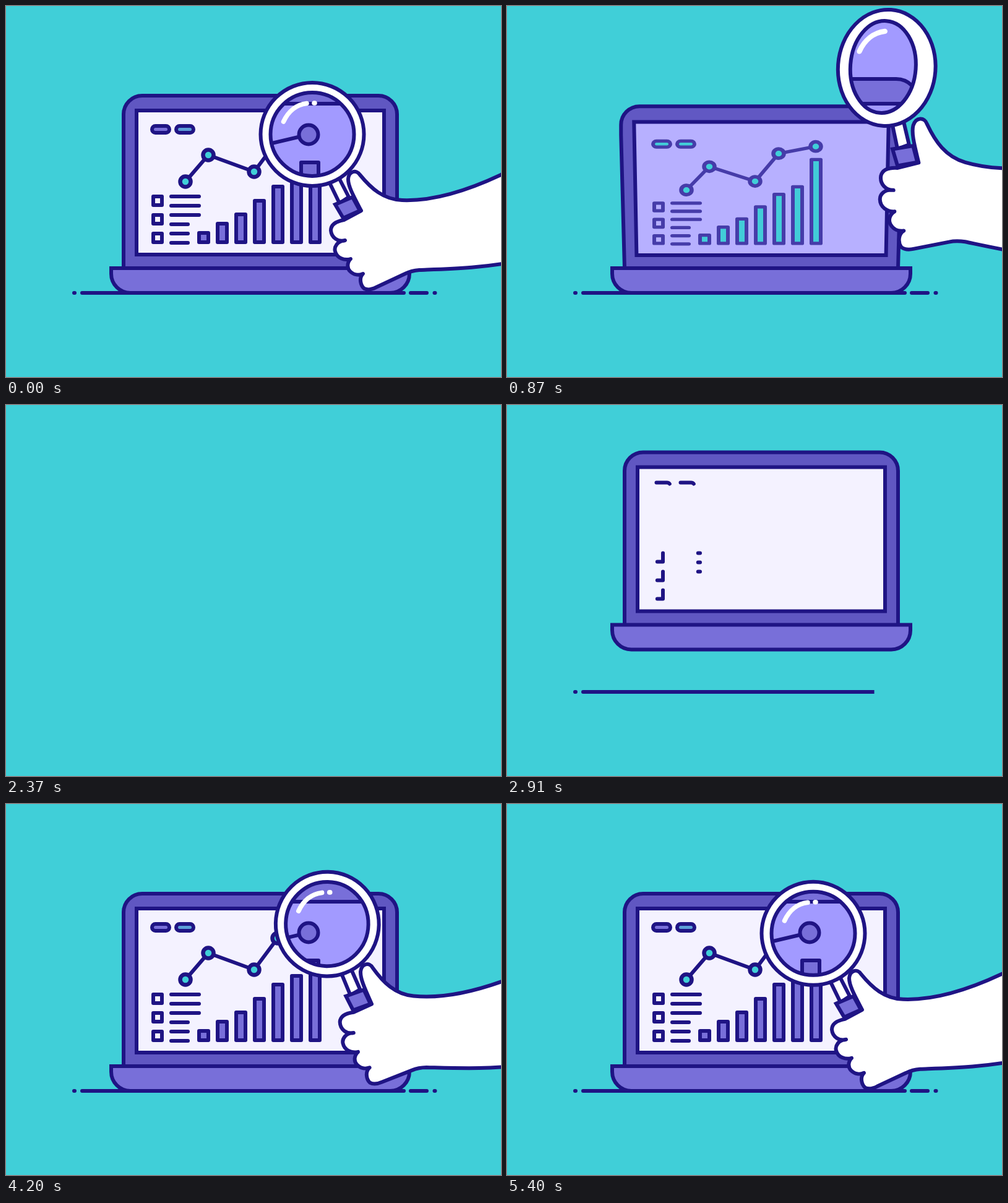
Write an HTML page with a canvas that moves like this. It is 800 by 600 pixels and loops after 5430 ms.

```html
<!DOCTYPE html>
<html lang="en">
<head>
<meta charset="utf-8">
<title>Laptop analytics</title>
<style>
html, body { margin: 0; width: 100%; height: 100%; overflow: hidden; background: #40cfd8; }
canvas { display: block; }
</style>
</head>
<body>
<canvas id="stage" width="800" height="600"></canvas>
<script>
const ctx = document.getElementById('stage').getContext('2d');
const LOOP = 5430;
const INK = '#1f1484', TEAL = '#40cfd8', VIOLET = '#786fd9', LENS = '#a29aff', WHITE = '#ffffff';
const POINTS = [[290, 284], [327, 241], [401, 268], [439, 217], [499, 204]];
const BAR_TOPS = [367, 352, 337, 315, 292, 278, 228];
const HAND_SHAPE = new Path2D(
  'M960 180C860 245 740 318 640 314C610 313 590 295 572 273C566 264 554 267 553 280' +
  'C553 292 562 308 574 331L546 346C530 349 525 356 525 363C526 375 537 382 548 379' +
  'C535 380 530 390 532 397C535 408 547 412 557 409C551 415 551 424 556 429' +
  'C562 435 570 436 577 433C570 440 573 452 579 457C585 460 592 458 598 455' +
  'L645 433Q655 428 668 427C720 425 770 424 830 412C900 398 960 375 1060 330Z');

const clamp = (v) => Math.max(0, Math.min(1, v));
const ramp = (t, a, b) => clamp((t - a) / (b - a));
const lerp = (a, b, p) => a + (b - a) * p;
const smooth = (p) => p * p * (3 - 2 * p);
const easeOut = (p) => 1 - (1 - p) ** 3;
const backOut = (p) => 1 + 3.3 * (p - 1) ** 3 + 2.3 * (p - 1) ** 2;
const arch = (p) => Math.sin(Math.PI * p);

function mix(a, b, p) {
  const ch = (c, i) => parseInt(c.slice(i, i + 2), 16);
  return 'rgb(' + [1, 3, 5].map((i) => Math.round(lerp(ch(a, i), ch(b, i), clamp(p)))).join() + ')';
}

function pen(color = INK, width = 6) {
  ctx.strokeStyle = color;
  ctx.lineWidth = width;
  ctx.lineCap = ctx.lineJoin = 'round';
}

function paint(fill) {
  ctx.fillStyle = fill;
  ctx.fill();
  ctx.stroke();
}

function poly(points, close) {
  ctx.beginPath();
  points.forEach(([x, y]) => ctx.lineTo(x, y));
  if (close) ctx.closePath();
}

function disc(x, y, r, fill) {
  ctx.beginPath();
  ctx.arc(x, y, r, 0, 7);
  paint(fill);
}

function box(x, y, w, h, r, fill) {
  ctx.beginPath();
  ctx.roundRect(x, y, w, h, r);
  paint(fill);
}

// Strokes only the leading part of the current path.
function trim(length, p) {
  if (p <= 0) return;
  if (p < 1) ctx.setLineDash([length * p, length * 2]);
  ctx.stroke();
  ctx.setLineDash([]);
}

function drawPills(p, fade) {
  [250, 289].forEach((x, i) => {
    ctx.beginPath();
    ctx.roundRect(x - 14, 194, 28, 11, 5.5);
    if (p >= 0.9) {
      ctx.fillStyle = mix(i ? '#5c9fd8' : VIOLET, TEAL, fade);
      ctx.fill();
    }
    trim(70, p);
  });
}

function drawList(t) {
  for (let i = 0; i < 3; i++) {
    const y = 315 + i * 30;
    poly([[252, y - 7], [252, y + 7], [238, y + 7], [238, y - 7]], true);
    trim(57, easeOut(ramp(t, 2855, 3200)));
  }
  for (let i = 0; i < 6; i++) {
    const right = i < 3 ? 312 : 294, start = i < 3 ? 2902 : 2960;
    poly([[right, 308 + i * 15], [267, 308 + i * 15]]);
    trim(right - 267, easeOut(ramp(t, start, start + 330)));
  }
}

function drawBars(t, fill) {
  BAR_TOPS.forEach((top, i) => {
    const start = 3094 + 72 * i;
    if (t <= start) return;
    const h = Math.max(0, (382 - top) * backOut(ramp(t, start, start + 560)));
    box(312 + 30 * i, 382 - h, 15, h, 0, fill);
  });
}

function drawChart(t, ink) {
  poly(POINTS);
  trim(261, ramp(t, 3180, 3685));
  POINTS.forEach(([x, y], i) => {
    const start = 3350 + 70 * i;
    const s = ramp(t, start, start + 220);
    if (!s) return;
    pen(ink, 6.5 * s);
    disc(x, y, 8.5 * s, TEAL);
  });
}

function drawContent(t, shut) {
  const ink = mix(INK, LENS, 4 * shut);
  const fade = clamp(13 * shut);
  ctx.save();
  ctx.globalAlpha = 1 - ramp(shut, 0.08, 0.25);
  ctx.translate(0, 382 + 2 * fade);
  ctx.scale(1, 1 - 1.6 * Math.min(shut, 0.3));
  ctx.translate(0, -382);
  pen(ink);
  drawPills(easeOut(ramp(t, 2865, 3250)), fade);
  drawList(t);
  drawBars(t, mix(VIOLET, TEAL, fade));
  drawChart(t, ink);
  ctx.restore();
}

function drawLid(shut, tint) {
  const cx = 411, base = 424, r = 30;
  const h = lerp(279, 49, shut), top = base - h;
  const spread = 21 * Math.sqrt(shut), wide = 221 + spread;
  const knee = base - lerp(h - r, 8, shut);
  ctx.beginPath();
  ctx.moveTo(cx - 221, base);
  ctx.lineTo(cx - wide, knee);
  ctx.arcTo(cx - wide, top, cx, top, r);
  ctx.arcTo(cx + wide, top, cx + wide, knee, r);
  ctx.lineTo(cx + wide, knee);
  ctx.lineTo(cx + 221, base);
  paint(mix('#6057c2', '#746ad2', shut));

  const y0 = top + 24 + 18 * shut, y1 = base - 22 + 15 * shut;
  const half = 200 + spread, foot = 200 + 21 * shut;
  poly([[cx - half, y0], [cx + half, y0], [cx + foot, y1], [cx - foot, y1]], true);
  paint(mix('#f4f2ff', LENS, tint));
}

// Sinks through the ground, leaps back out, then lands.
function laptopDrop(t) {
  if (t < 2000) return 110 * ramp(t, 1240, 1460) ** 1.85;
  if (t < 2885) return lerp(110, -70, arch(ramp(t, 2440, 2885) / 2));
  return -70 * (1 - smooth(ramp(t, 2885, 3180)));
}

function drawLaptop(t) {
  const dy = laptopDrop(t);
  if (dy > 105) return;
  const closing = t < 2000;
  const shut = closing ? smooth(ramp(t, 600, 1260) ** 2) : 1 - smooth(ramp(t, 2480, 2860));
  ctx.save();
  ctx.beginPath();
  ctx.rect(0, 0, 800, 467);
  ctx.clip();
  ctx.translate(0, dy);
  pen();
  ctx.lineJoin = 'miter';
  drawLid(shut, closing ? 10 * shut : 0);
  if (closing) drawContent(LOOP, shut);
  else if (t > 2850) drawContent(t, 0);
  pen();
  ctx.lineJoin = 'miter';
  ctx.beginPath();
  ctx.moveTo(170, 424);
  ctx.lineTo(652, 424);
  ctx.arcTo(652, 464, 600, 464, 31);
  ctx.arcTo(170, 464, 170, 424, 31);
  ctx.closePath();
  paint(VIOLET);
  ctx.restore();
}

function drawGround(t) {
  const shown = t < 2330 ? 1 - ramp(t, 1740, 2260) : ramp(t, 2400, 3020);
  ctx.save();
  ctx.beginPath();
  ctx.rect(0, 450, lerp(100, 700, shown), 30);
  ctx.clip();
  pen();
  [[110, 111], [123, 643], [654, 680], [692.5, 693.5]].forEach(([a, b]) => {
    poly([[a, 464], [b, 464]]);
    ctx.stroke();
  });
  ctx.restore();
}

// Enlarged view seen through the glass; it stays fixed on the stage.
function drawMagnified() {
  ctx.fillStyle = LENS;
  ctx.fillRect(0, 0, 800, 600);
  pen();
  box(60, 118, 605, 400, 36, VIOLET);
  box(100, 158, 600, 400, 0, LENS);
  poly([[400, 229], [489, 208]]);
  ctx.stroke();
  disc(489, 208, 15.5, VIOLET);
  box(477, 253, 28, 130, 0, VIOLET);
}

function drawGlint(x, y, s, squash) {
  ctx.save();
  ctx.translate(x, y);
  ctx.scale(s, s);
  ctx.translate((1 - squash) * 22, (squash - 1) * 12);
  pen(WHITE, 7.5);
  ctx.beginPath();
  ctx.moveTo(-46.5, -20.5);
  ctx.bezierCurveTo(-39, -37, -26, -48, -9, -50);
  ctx.stroke();
  if (squash > 0.88) {
    poly([[3, -50.5], [4, -50.5]]);
    ctx.stroke();
  }
  ctx.restore();
}

// One angle drives the whole swing: place, size and how edge-on the glass is.
function handPose(t) {
  const entering = t > 2000;
  const deg = entering ? 41 * (1 - ramp(t, 3560, 4560)) ** 2.385 : 14 * (t / 870) ** 4;
  const bob = entering ? 24 * arch(ramp(t, 4200, LOOP)) : -28 * arch(ramp(t, 0, 870));
  return {
    x: 552 + 4.2 * deg + 0.165 * deg * deg,
    y: 326 - 95 * Math.sin(Math.PI * deg / 36) ** 2 + bob,
    turn: deg * Math.PI / 180,
    s: 1 + 0.0009 * deg ** 1.8,
    squash: Math.max(0.2, Math.cos(3.2 * deg * Math.PI / 180))
  };
}

function drawHand(t) {
  if (t > 1160 && t < 3560) return;
  const { x, y, turn, s, squash } = handPose(t);
  const place = () => {
    ctx.translate(x, y);
    ctx.rotate(turn);
    ctx.scale(s, s);
    ctx.translate(-552, -326);
    pen(INK, 6 / s);
  };
  const oval = (cx, rx, ry) => {
    ctx.beginPath();
    ctx.ellipse(cx, 207.5, rx, ry, -0.7 * turn, 0, 7);
  };
  const lens = () => oval(495 - 19 * (1 - squash), 67.5 * squash, 67.5);

  ctx.save();
  place();
  poly([[522, 284], [539, 319], [554, 309], [537, 276]]);
  paint(WHITE);
  oval(495, 83.5 * (1 + squash) / 2, 83.5 + 6 * (1 - squash));
  paint(WHITE);
  ctx.save();
  lens();
  ctx.clip();
  ctx.setTransform(1, 0, 0, 1, 0, 0);
  drawMagnified();
  ctx.restore();
  lens();
  ctx.stroke();
  ctx.restore();

  const dx = -57 * s, dy = -118.5 * s;
  drawGlint(x + dx * Math.cos(turn) - dy * Math.sin(turn),
    y + dx * Math.sin(turn) + dy * Math.cos(turn), s, squash);

  ctx.save();
  place();
  ctx.fillStyle = WHITE;
  ctx.fill(HAND_SHAPE);
  ctx.stroke(HAND_SHAPE);
  ctx.lineJoin = 'miter';
  poly([[532, 321], [560, 309], [572, 331], [545, 343]], true);
  paint(VIOLET);
  ctx.restore();
}

function draw(now) {
  const t = now % LOOP;
  ctx.setTransform(1, 0, 0, 1, 0, 0);
  ctx.fillStyle = TEAL;
  ctx.fillRect(0, 0, 800, 600);
  drawLaptop(t);
  drawGround(t);
  drawHand(t);
}

let begin = null;
function tick(now) {
  if (begin === null) begin = now;
  draw(now - begin);
  requestAnimationFrame(tick);
}
draw(0);
requestAnimationFrame(tick);
</script>
</body>
</html>
```
